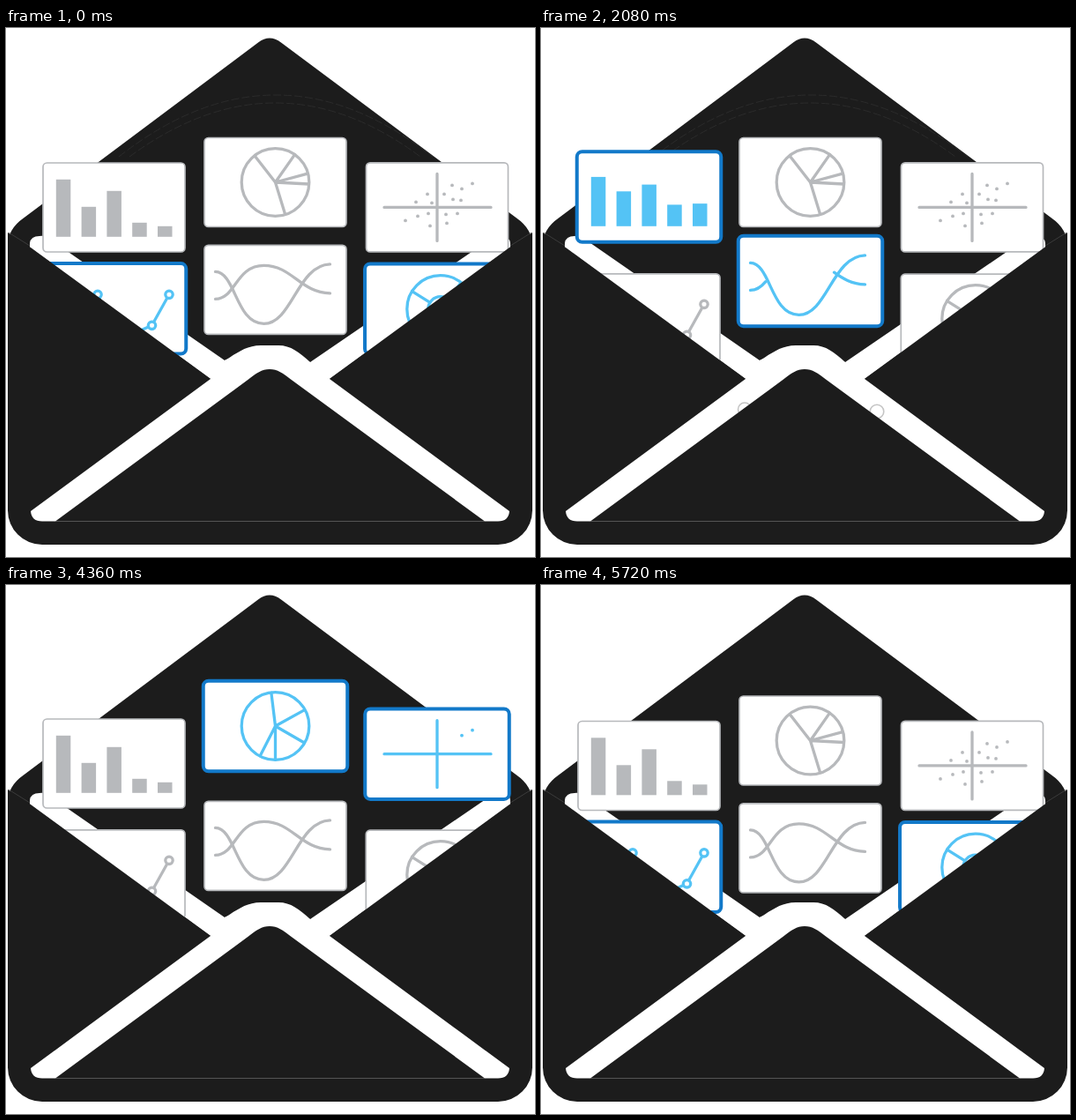
An HTML page for the animation above (5.76 s loop, 600 by 600 pixels).

```html
<!DOCTYPE html>
<html lang="en">
<head>
<meta charset="utf-8">
<title>Charts in an envelope</title>
<style>
  html, body { margin: 0; width: 100%; height: 100%; overflow: hidden; background: #fff; }
  svg { display: block; width: 100vw; height: 100vh; }
  .ink { fill: #1c1c1c; }
  .paper { fill: #fff; }
  .chart { fill: none; stroke-width: 3.3; stroke-linecap: round; stroke-linejoin: round; }
  .faint { fill: none; stroke: #2b2b2b; stroke-width: 1; stroke-dasharray: 9 3; }
  .crease { fill: none; stroke: #4a4a4a; stroke-width: .7; }
  .ring { fill: none; stroke: #c4c4c4; stroke-width: 1.6; }
</style>
</head>
<body>
<svg viewBox="0 0 600 600">
  <path class="ink" d="M286 16.500Q299 6.500 312 16.500L579 215.500Q597 228 597 247V547A39 39 0 0 1 558 586H41A39 39 0 0 1 2 547V247Q2 228 20 215.500Z"/>
  <g id="arcs" class="faint">
    <path d="M128 146Q306 6 484 146"/>
    <path d="M140 146Q306 24 470 146"/>
  </g>
  <path class="paper" d="M27 249V244Q28 236 38 236Q44 235 49 239L248 377L299 360L345 379L550 239Q555 235 561 236Q571 236 572 244V249L367 398H232Z"/>
  <g id="cards"></g>
  <path class="ink" d="M2 232L28 249L232 398L28 548H2Z"/>
  <path class="ink" d="M597 232L571 249L367 398L571 548H597Z"/>
  <path class="crease" d="M3 232L27 247M596 232L572 247"/>
  <path class="paper" d="M28 548L232 398L248 377C262 369 272 360 289 360H309C323 360 333 368 345 379L367 398L571 548Q570 559.500 558 559.500H41Q29 559.500 28 548Z"/>
  <g id="rings" class="ring">
    <circle cx="231" cy="432.500" r="7.500"/>
    <circle cx="381" cy="435" r="7.800"/>
  </g>
  <path class="ink" d="M56 559.500L275 398.500C284 391.500 290 387 299 387S314 391.500 323 398.500L543 559.500Z"/>
</svg>
<script>
const LOOP = 5760, FADE = 320;
const GREY = [183, 185, 188], SKY = [84, 195, 245], BLUE = [18, 121, 201];

const byId = id => document.getElementById(id);
const clamp = x => Math.max(0, Math.min(1, x));
const smooth = x => { x = clamp(x); return x * x * (3 - 2 * x); };
const lerp = (a, b, p) => a + (b - a) * p;
const mix = (a, b, p) => `rgb(${a.map((v, i) => Math.round(lerp(v, b[i], p)))})`;

function set(el, attrs) {
  for (const k in attrs) el.setAttribute(k, attrs[k]);
}

function add(parent, tag, attrs) {
  const el = document.createElementNS('http://www.w3.org/2000/svg', tag);
  set(el, attrs);
  return parent.appendChild(el);
}

// Eased blend between [time, values] stops.
function keyed(t, stops) {
  if (t <= stops[0][0]) return stops[0][1];
  for (let i = 1; i < stops.length; i++) {
    const [t0, a] = stops[i - 1], [t1, b] = stops[i];
    if (t <= t1) return a.map((v, j) => lerp(v, b[j], smooth((t - t0) / (t1 - t0))));
  }
  return stops[stops.length - 1][1];
}

// How far a card is raised; the window may cross the loop point.
function level(t, from, to) {
  const wrap = x => (x + LOOP) % LOOP;
  const u = wrap(t - from);
  return smooth(u / FADE) * (1 - smooth((u - wrap(to - from)) / FADE));
}

function spokes(angles, inner, outer) {
  return angles.map(deg => {
    const a = deg * Math.PI / 180, c = Math.cos(a), s = Math.sin(a);
    return `M${inner * c} ${inner * s}L${outer * c} ${outer * s}`;
  }).join('');
}

function bars(g) {
  const rest = [65, 34, 52, 16, 12], tall = [27, 57, 32, 51, 69];
  const rects = rest.map((h, i) => add(g, 'rect', { x: -65.7 + 28.8 * i, width: 16.5, stroke: 'none' }));
  return (t, color) => {
    const heights = keyed(t, [[1800, rest], [2680, tall], [2780, tall], [3460, rest]]);
    rects.forEach((r, i) => set(r, { y: 33.3 - heights[i], height: heights[i], fill: color }));
  };
}

function waves(g) {
  const curve = d => add(g, 'path', { d, pathLength: 100 });
  const a = curve('M-68 -20.5C-45 -20 -45 38.5 -13 38.5S25 -28 62 -29');
  const b = curve('M-68 10.5C-45 10.5 -45 -27.5 -13 -27.5S28 3 62 4');
  const wipe = (el, t, out, outEnd, back, backEnd) => {
    const front = 100 * clamp((t - out) / (outEnd - out));
    const tail = 100 * clamp((t - back) / (backEnd - back));
    set(el, { 'stroke-dasharray': front === tail ? 'none' : `${tail} ${front - tail} 100` });
  };
  return t => {
    wipe(a, t, 2200, 2920, 2660, 3340);
    wipe(b, t, 1720, 2200, 2000, 2600);
  };
}

function pie(g) {
  add(g, 'circle', { r: 38.3 });
  const lines = add(g, 'path', {});
  const rest = [-128, -55, -15, 3, 73];
  const stops = [[3560, rest], [4360, [-97, -29, 30, 90, 117]], [5000, [-94, -29, 28, 42, 81]], [5400, rest]];
  return t => set(lines, { d: spokes(keyed(t, stops), 0, 38) });
}

function scatter(g) {
  add(g, 'path', { d: 'M-60 0H61M0 -38V38' });
  const spots = [
    [-36, 15], [-24, -6], [-22, 10], [-11, -15], [-10, 7], [-8, 21], [-6, -5], [8, -15],
    [10, 8], [11, 18], [17, -25], [18, -9], [23, 7], [27, -8], [28, -21], [40, -27]
  ];
  const dots = spots.map(([cx, cy]) => add(g, 'circle', { cx, cy, r: 1.9, stroke: 'none' }));
  return (t, color) => dots.forEach((dot, i) => {
    const x = spots[i][0] + 36;
    const hidden = t > 3700 + x * 10.4 && t < 4465 + x * 10;
    set(dot, { fill: color, opacity: hidden ? 0 : 1 });
  });
}

function lines(g) {
  const xs = [-62, -41, -18.5, 1, 23, 43, 62.5];
  const path = add(g, 'path', {});
  const nodes = xs.map(cx => add(g, 'circle', { cx, r: 4.2, fill: '#fff' }));
  const rest = [20, 5, -16, 30, 28, 19, -16], moved = [4, 18, 2, 8, 24, 4, 6];
  return t => {
    const ys = keyed(t, [[100, rest], [680, moved], [1300, rest]]);
    set(path, { d: 'M' + xs.map((x, i) => `${x} ${ys[i]}`).join('L') });
    nodes.forEach((n, i) => set(n, { cy: ys[i] }));
  };
}

function donut(g) {
  add(g, 'circle', { cx: 4, r: 38 });
  add(g, 'circle', { cx: 4, r: 14 });
  const cuts = add(g, 'path', { transform: 'translate(4 0)' });
  const rest = [-148, -52, 20, 100];
  return t => set(cuts, {
    d: spokes(keyed(t, [[100, rest], [680, [-120, -30, 60, 130]], [1300, rest]]), 14, 38)
  });
}

// chart, centre x, centre y, lift, raise time, drop time
const cards = [
  [lines, 122.5, 329.3, 11, 5300, 1395],
  [donut, 488.8, 329.7, 11, 5300, 1395],
  [bars, 122.5, 203.5, 12, 1472, 3466],
  [pie, 305.5, 175, 14, 3328, 5250],
  [scatter, 489, 203.4, 10.7, 3254, 5230],
  [waves, 305.5, 296.9, 10, 1350, 3340]
].map(([chart, x, y, lift, from, to]) => {
  const g = add(byId('cards'), 'g', {});
  const box = add(g, 'rect', { fill: '#fff' });
  const art = add(g, 'g', { class: 'chart' });
  const update = chart(art);
  return (t, drift) => {
    const p = level(t, from, to), color = mix(GREY, SKY, p);
    const w = lerp(161, 163.5, p), h = lerp(101, 102.5, p);
    set(g, { transform: `translate(${x} ${y - lift * p + drift})` });
    set(box, {
      x: -w / 2, y: -h / 2, width: w, height: h, rx: lerp(4.5, 6, p),
      stroke: mix(GREY, BLUE, p), 'stroke-width': lerp(1.7, 4, p)
    });
    set(art, { stroke: color });
    update(t, color);
  };
});

function draw(t) {
  const [drift] = keyed(t, [[3500, [0]], [4360, [-1]], [5000, [0]], [5720, [1.5]]]);
  cards.forEach(card => card(t, drift));
  set(byId('arcs'), { opacity: t < 4200 ? 1 : 0 });
  set(byId('rings'), { opacity: t >= 300 && t < 3900 ? 1 : 0 });
}

const start = performance.now();
function tick() {
  const t = (performance.now() - start) % LOOP;
  draw(Math.floor(t / 40) * 40);
  requestAnimationFrame(tick);
}
tick();
</script>
</body>
</html>
```
